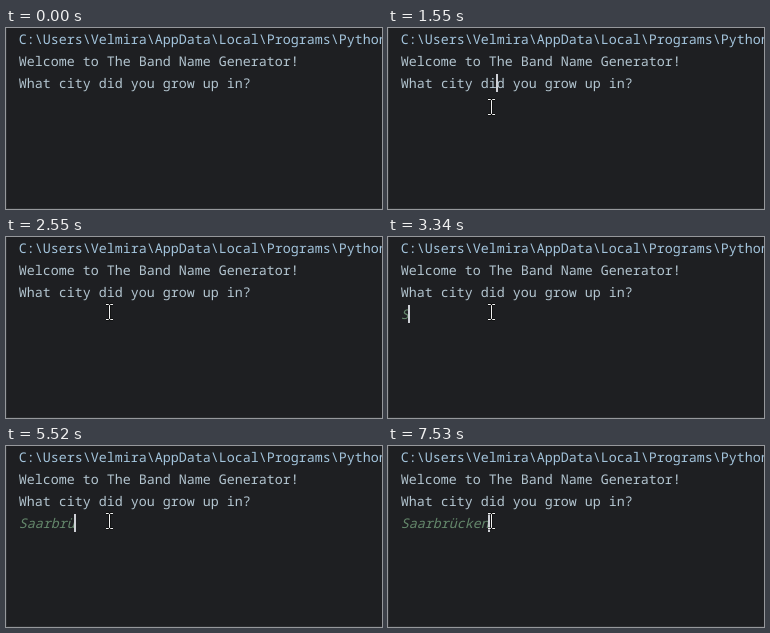
Animation, 376 px wide and 181 px high, one loop 8000 ms. Source, as an HTML page with a canvas:

```html
<!DOCTYPE html>
<html lang="en">
<head>
<meta charset="utf-8">
<title>Console session</title>
<style>
  html, body { margin: 0; height: 100%; overflow: hidden; background: #1e1f22; }
  canvas { display: block; }
</style>
</head>
<body>
<canvas id="stage" width="376" height="181"></canvas>
<script>
const ctx = document.getElementById('stage').getContext('2d');
const LOOP = 8000, LEFT = 12.8, CELL = 8, LINE = 22;
const FONT = '13.333px "Noto Sans Mono", "DejaVu Sans Mono", monospace';

const output = [
  ['C:\\Users\\Velmira\\AppData\\Local\\Programs\\Python\\', '#a3c4dc'],
  ['Welcome to The Band Name Generator!', '#b3c5d0'],
  ['What city did you grow up in?', '#b3c5d0'],
];
const answer = 'Saarbrücken';
const keyTimes = [3340, 4060, 4260, 4520, 4920, 5190, 5520, 5790, 6000, 6200, 6400];

// [time, x, y]
const pointer = [
  [130, 268, 174], [200, 180, 132], [270, 122, 104],
  [470, 119, 92], [530, 115, 74], [600, 113, 66],
  [1420, 108, 73], [1550, 103, 79], [1690, 103, 75],
];
const clicks = [[1020, 1150], [1780, 1950]];
const caretHidden = [[0, 1020], [2550, 3010], [4000, 4060], [7000, 7530]];

const latest = (steps, t) => steps.filter(s => s[0] <= t).pop();
const within = (spans, t) => spans.some(([from, to]) => t >= from && t < to);

function drawText(text, row, color, style = '') {
  ctx.font = style + FONT;
  ctx.fillStyle = color;
  ctx.fillText(text, LEFT, 16 + row * LINE);
}

function drawCaret(column, row) {
  ctx.fillStyle = '#ced0d6';
  ctx.fillRect(Math.max(13, 12 + column * CELL), 2 + row * LINE, 2, 18);
}

function drawPointer(x, y) {
  const beam = new Path2D(
    `M${x - 3} ${y - 7.5}h2.5l1 1l1-1h2.5M${x + .5} ${y - 6.5}v13` +
    `M${x - 3} ${y + 7.5}h2.5l1-1l1 1h2.5`);
  for (const [width, color] of [[2.4, 'rgba(0,0,0,.6)'], [1, '#f2f2f2']]) {
    ctx.lineWidth = width;
    ctx.strokeStyle = color;
    ctx.stroke(beam);
  }
}

function draw(t) {
  ctx.fillStyle = '#1e1f22';
  ctx.fillRect(0, 0, 376, 181);
  ctx.fillStyle = '#2b2d30';
  ctx.fillRect(0, 0, 1, 181);
  ctx.fillRect(0, 180, 376, 1);

  ctx.textRendering = 'geometricPrecision';
  output.forEach(([text, color], row) => drawText(text, row, color));
  const typed = keyTimes.filter(k => k <= t).length;
  drawText(answer.slice(0, typed), 3, '#64876b', 'italic ');

  if (!within(caretHidden, t)) t < 1860 ? drawCaret(12, 2) : drawCaret(typed, 3);

  const at = latest(pointer, t);
  if (!at) return;
  const [, x, y] = at;
  if (within(clicks, t)) {
    ctx.fillStyle = 'rgba(222,205,20,.76)';
    ctx.beginPath();
    ctx.arc(x - 2, y - (y < 70 ? 1 : 0), 12, 0, Math.PI * 2);
    ctx.fill();
    if (t < 1860) drawCaret(12, 2);
  }
  drawPointer(x, y);
}

const start = performance.now();
function tick() {
  draw((performance.now() - start) % LOOP);
  requestAnimationFrame(tick);
}
tick();
</script>
</body>
</html>
```
